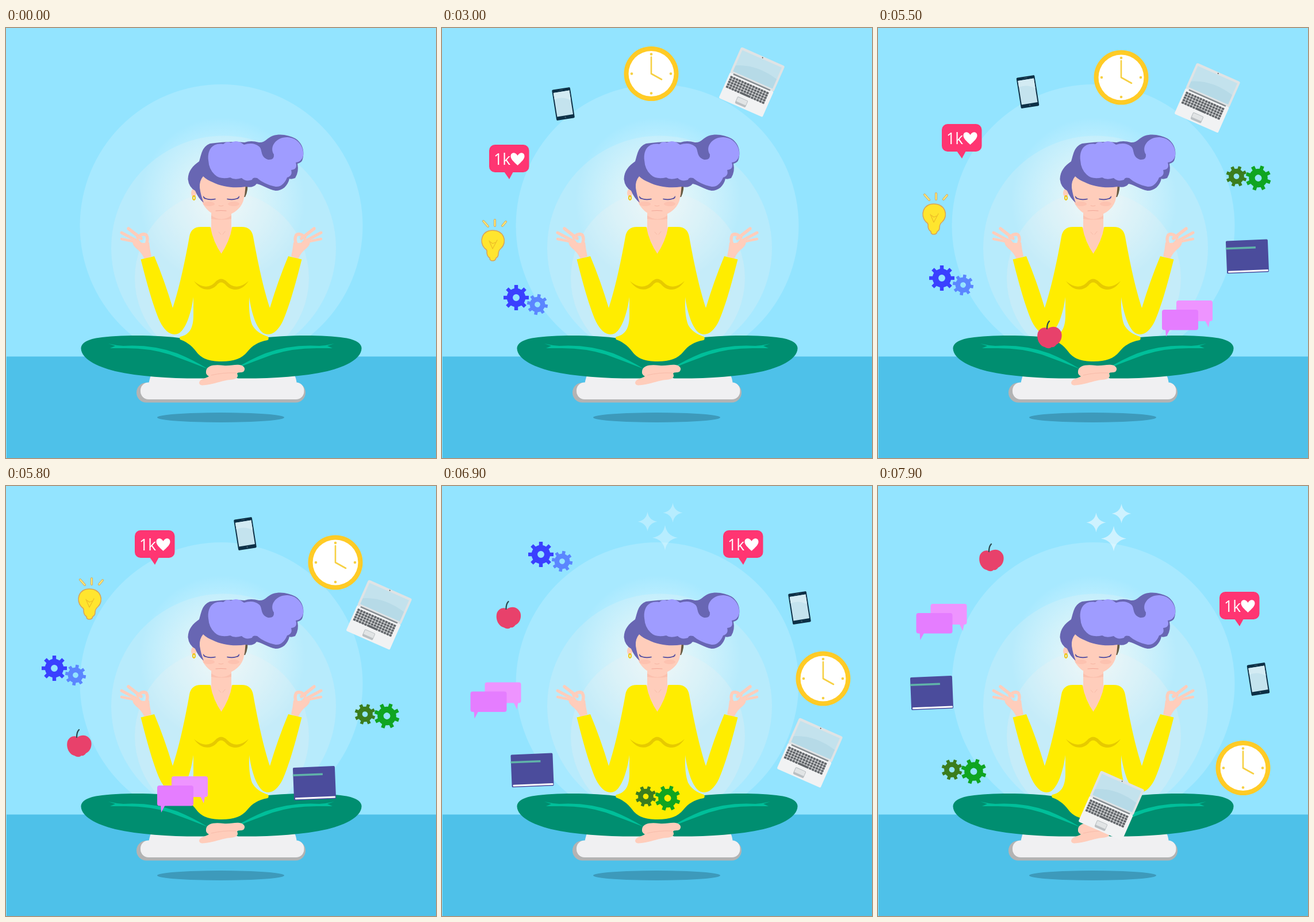
Animation of 748 by 748 pixels, one loop 8 s. Source, as an HTML page with a canvas:

```html
<!DOCTYPE html>
<html lang="en">
<head>
<meta charset="utf-8">
<title>Meditation</title>
<style>
  html, body { margin: 0; width: 100%; height: 100%; overflow: hidden; background: #93e4ff; }
  canvas { display: block; }
</style>
</head>
<body>
<canvas id="stage" width="748" height="748"></canvas>
<script>
const ctx = document.getElementById('stage').getContext('2d');
const LOOP = 8000, TAU = Math.PI * 2, AXIS = 374.5;
const SKIN = '#ffcdbb', YELLOW = '#ffed00', DARK_HAIR = '#6866b3', LIGHT_HAIR = '#9f9cff';

// ---------- drawing helpers ----------
function fill(d, color) {
  ctx.fillStyle = color;
  ctx.fill(new Path2D(d));
}
function line(d, color, width) {
  ctx.strokeStyle = color;
  ctx.lineWidth = width;
  ctx.lineCap = ctx.lineJoin = 'round';
  ctx.stroke(new Path2D(d));
}
function oval(x, y, rx, ry, color) {
  ctx.fillStyle = color;
  ctx.beginPath();
  ctx.ellipse(x, y, rx, ry, 0, 0, TAU);
  ctx.fill();
}
const disc = (x, y, r, color) => oval(x, y, r, r, color);
function box(x, y, w, h, color, r = 0) {
  ctx.fillStyle = color;
  ctx.beginPath();
  ctx.roundRect(x, y, w, h, r);
  ctx.fill();
}
function local(x, y, angle, draw) {
  ctx.save();
  ctx.translate(x, y);
  ctx.rotate(angle * Math.PI / 180);
  draw();
  ctx.restore();
}
function bothSides(draw) {
  draw();
  ctx.save();
  ctx.translate(AXIS * 2, 0);
  ctx.scale(-1, 1);
  draw();
  ctx.restore();
}

// ---------- scene ----------
function background() {
  box(0, 0, 748, 748, '#93e4ff');
  disc(374.5, 344, 246, 'rgba(255,255,255,.18)');
  disc(378.5, 383, 195.5, 'rgba(240,240,240,.21)');
  const glow = ctx.createRadialGradient(376, 300, 20, 376, 300, 145);
  glow.addColorStop(0, 'rgba(255,253,248,.68)');
  glow.addColorStop(.5, 'rgba(255,253,248,.36)');
  glow.addColorStop(1, 'rgba(255,255,255,0)');
  disc(376, 300, 145, glow);
  disc(375.5, 435, 151.5, 'rgba(238,238,238,.25)');
  box(1, 571.5, 747, 177, '#4ec1e9');
  oval(373.5, 677.5, 110.5, 8.5, '#3d9abb');
}

function cushion() {
  box(227, 617, 294, 34.5, '#b3b3b3', 17);
  box(234, 616.5, 284.5, 29.5, '#f0f0f2', 14);
  fill('M248 620Q250 608 254 600H500Q505 608 506 620Z', '#f0f0f2');
}

function legs() {
  bothSides(() => {
    fill('M376 560L310 540C265 534 200 533 160 539C140 542 130 549 130.500 558C132 575 155 588 190 597C235 607 290 610 345 609.500L380 600Z', '#008e70');
    fill('M178 549Q190 552 204 553Q254 550 298 566Q325 577 351 593Q318 580 285 568Q248 556 202 557L181 557L190 553Z', '#00bf9a');
  });
  fill('M348 597C349 587 362 585 378 587C390 588 398 585 406 586C414 587 418 593 413 598C409 600 404 598 402 601C405 607 402 611 390 612C376 613 367 618 354 620C345 621 337 624 336 617C337 610 347 610 353 606Q347 603 348 597Z', SKIN);
  line('M357 604Q378 599 400 600', '#f8bba9', 1);
}

function hand() {
  line('M231 373L201 367', SKIN, 4.5);
  line('M231 372L201 356', SKIN, 5);
  line('M235 366L213 349', SKIN, 5.5);
  line('M229 364Q238 356 244 360Q248 367 244 376', SKIN, 5.5);
  fill('M221 368L231 366Q231 374 240 374L249 373Q250 384 253 397L241 402Q235 389 226 383Q218 376 221 368Z', SKIN);
}

function shirt() {
  fill('M357 322H392V346L396 352L375 397L354 352L357 346Z', SKIN);
  fill('M357 326Q375 339 392 326V332Q375 335 357 332Z', '#fbc0ae');
  line('M370 355L374 359M381 354L377 359', '#f7bba8', 1);
  bothSides(() => fill('M355.500 346H339C327 346 321 352 319 363C311 408 301 454 290 487Q276 440 258 397L234.500 402.500C244 440 256 485 268 511C277 529 289 537 301 531C313 523 322 497 326 468L376 450V395Q360 372 355.500 346Z', YELLOW));
  fill('M325 440H424L423 470Q422 500 428 516Q436 531 456 537Q458 541 455 543C438 546 428 553 420 563C410 575 397 580 375 580C353 580 340 575 331 563C322 551 312 545 303 542Q301 539 303 537C320 534 326 520 326 500V468Z', YELLOW);
  fill('M327 440C340 452 354 453 364 442Q374 431 385 442C395 453 409 452 422 440C410 459 393 458 383 448Q374 437 366 448C355 459 338 457 327 440Z', '#e6ca00');
}

function head() {
  fill('M414 266H420Q422 282 416 294H412Z', '#665a42');
  oval(326.5, 287, 4.5, 7, SKIN);
  ctx.strokeStyle = '#f0c400';
  ctx.lineWidth = 1.8;
  ctx.beginPath();
  ctx.ellipse(327, 295.5, 2, 3.5, 0, 0, TAU);
  ctx.stroke();
  fill('M335 262L352 250H415Q419 278 413 300C408 317 390 327 376 327C361 327 347 317 341 302Q331 288 335 262Z', SKIN);
  oval(353, 306, 10, 4, 'rgba(250,174,158,.35)');
  oval(396, 306, 10, 4, 'rgba(250,174,158,.35)');
  bothSides(() => {
    line('M344 295Q352 300 364 297.500', '#4a489f', 1.6);
    line('M346 297L343.500 293', '#4a489f', 1.2);
  });
  line('M370 309Q374 311 378 309', '#f6b6a3', 1);
  line('M365 318Q374 317 383 318', '#f3a797', 1.2);
  fill('M344 304Q334 296 329 283Q318 277 316.500 263C317 248 325 240 336 232C340 221 340 207 355 201Q390 196 415 199Q426 195 440 199C451 200 454 191 464 187.500C478 183 493 187 503 192C516 200 520 215 516 228Q515 234 507 236Q510 250 503 261Q495 264 493 262C490 275 481 283 469 283C456 281 447 273 436 271Q430 279 417 276C398 279 377 277 359 268Q349 264 343 258Q336 266 337 278Q339 292 344 304Z', DARK_HAIR);
  fill('M352 230C350 211 360 199 378 202Q384 196 391 199.500Q402 193 414 203Q430 198 440 206C447 211 441 224 456 229Q467 230 466 220C457 206 471 189 490 190C509 191 519 209 517 222Q514 233 504 234Q508 246 496 247Q499 257 489 260C485 270 478 277 469 276C455 273 445 268 437 261Q429 259 428 264Q417 268 410 261Q397 265 390 260Q372 264 363 255Q353 246 352 230Z', LIGHT_HAIR);
}

// ---------- floating things, each drawn around its centre ----------
function gear(x, y, r, color, angle) {
  local(x, y, angle, () => {
    const body = r * .74, hole = r * .27, w = r * .2;
    ctx.fillStyle = color;
    ctx.beginPath();
    ctx.arc(0, 0, body, 0, TAU);
    ctx.arc(0, 0, hole, 0, TAU, true);
    ctx.fill();
    for (let k = 0; k < 8; k++) {
      ctx.rotate(TAU / 8);
      ctx.fillRect(-w / 2 - 1, -r, w + 2, r - body + 2);
    }
  });
}

function bulb() {
  const edge = '#d7a65c';
  for (const ray of ['M-17 -33L-9 -24', 'M3 -35V-25', 'M22 -32L16 -25']) {
    line(ray, edge, 4);
    line(ray, '#ffec78', 2);
  }
  const glass = 'M-11 21Q-10 17 -15 14C-25 3 -20 -17 -1 -17C19 -17 25 3 14 14Q9 18 9 24Q9 29 5 31Q4 36 -1 36Q-6 36 -6 31Q-11 28 -11 21Z';
  fill(glass, '#ffe52e');
  line(glass, edge, 1.6);
  line('M-7 1L-1 15L7 0M-5 3L-1 6L4 4', '#edbc27', 1.2);
}

function like() {
  box(-35, -30, 69.5, 48, '#ff3572', 10);
  fill('M-9 17H7L0 30Z', '#ff3572');
  ctx.fillStyle = '#fff';
  ctx.font = '26.5px "Open Sans", "Noto Sans", sans-serif';
  ctx.fillText('1k', -27, 5);
  fill('M14.500 6C8 0 2.500 -5 2.500 -10C2.500 -17 11 -18 14.500 -11C18 -18 26.500 -17 26.500 -10C26.500 -5 21 0 14.500 6Z', '#fff');
}

function phone() {
  local(0, 0, -9, () => {
    box(-16, -27, 32, 54, '#0d3046', 2);
    box(-14, -21.5, 28, 42, '#c4e3ee');
    fill('M-14 -21.500H14V-4Q0 -14 -14 -10Z', '#d3ebf3');
    box(-3, -25, 6, 1, '#3e5b6c');
    disc(0, 23.5, 1.3, '#3e5b6c');
  });
}

function clock() {
  disc(0, 0, 47.5, '#ffcb26');
  disc(0, 0, 39.5, '#fff');
  for (let k = 0; k < 4; k++) {
    disc(34 * Math.cos(k * TAU / 4), 34 * Math.sin(k * TAU / 4), 2.3, '#f6d043');
  }
  line('M0 -29V0L18 10', '#f6d043', 2.6);
}

function laptop() {
  local(0, 0, 23.8, () => {
    box(-41.5, -48.5, 83, 49, '#dfe3e5', 3);
    box(-37.5, -44, 75, 40, '#c3e2ed');
    fill('M-37.500 -15Q-5 -32 37.500 -22V-4H-37.500Z', '#b6dae7');
    disc(0, -46.3, 1, '#555');
    box(-41.5, 0, 83, 48.5, '#f1f2f3', 2);
    box(-35, -1, 70, 2.5, '#858b8f');
    for (let row = 0; row < 5; row++) {
      for (let col = 0; col < 14; col++) {
        if (row === 4 && col > 4 && col < 9) continue;
        box(-38 + col * 5.25, 4.6 + row * 4.6, 4.4, 3.8, '#62666a', .6);
      }
    }
    box(-11.7, 23, 20.1, 3.8, '#62666a', .6);
    box(-12.5, 32.5, 20, 13, '#babfc2', 2);
    box(-11.5, 33.5, 18, 8, '#e1e4e5', 1);
  });
}

function book() {
  local(0, 0, -2.3, () => {
    box(-36, -28.5, 73, 57, '#4b4c9c', 2);
    box(-34, 24, 70, 3, '#fff', 1);
    box(-36.5, -17, 52, 3.6, '#60b3a9');
  });
}

function chat() {
  box(-19, -32, 63, 36, '#ee94ff', 4);
  fill('M31 3H39L37 15Z', '#ee94ff');
  box(-44, -16, 63, 35.5, '#e57dff', 4);
  fill('M-38 18H-30L-37 31Z', '#e57dff');
}

function apple() {
  fill('M-3 -10C-8 -14 -17 -11 -20 -3C-23 8 -17 20 -8 22C-3 25 1 25 4 22C7 23 10 21 12 18C20 14 23 5 21 -3C18 -12 8 -17 -3 -10Z', '#e8416b');
  line('M-4 -10Q-4 -19 0 -23', '#2d4b52', 2.3);
}

// home slot, then places after 1/3, 4/3, 3 and 4 slots of travel
const STOPS = [0, 1 / 3, 4 / 3, 3, 4];
const items = [
  { draw() { gear(-16, -4, 22, '#3a40ff', 0); gear(21, 8, 18, '#5b86ff', 10); },
    path: [145, 473, 127, 439, 100, 321, 188, 123, 386, 71], end: 7700 },
  { draw: bulb, path: [89, 369, 98, 323, 146, 196, 379, 71, 530, 106], end: 6500 },
  { draw: like, path: [117, 233, 146, 197, 259, 107, 524, 107, 629, 214] },
  { draw: phone, path: [211, 132, 260.5, 111, 416, 83, 622, 212, 661.5, 336] },
  { draw: clock, path: [364, 79.5, 423, 86, 573, 133, 663, 335, 635, 490.5] },
  { draw: laptop, path: [539, 94, 573, 121.5, 649, 224, 640, 464, 406, 556] },
  { draw() { gear(-21, -3, 18, '#3b7d1e', 20); gear(17, 0, 22, '#0fa521', 19); },
    path: [636, 214.5, 644.5, 261, 645.5, 400, 375.5, 543, 149.5, 496.5] },
  { draw: book, path: [654, 347.5, 642, 397.5, 536, 517, 156.5, 494.5, 93, 360] },
  { draw: chat, path: [617, 480, 538, 506, 307, 537, 93.5, 373.5, 110.5, 237] },
  { draw: apple, path: [374, 556, 298, 533, 127, 447, 115.5, 224, 197, 124] }
];

// smooth closed ring through all home slots
function ring(slot, axis) {
  const i = Math.floor(slot), f = slot - i;
  const [a, b, c, d] = [-1, 0, 1, 2].map(k => items[(i + k + 10) % 10].path[axis]);
  return b + f * (c - a + f * (2 * a - 5 * b + 4 * c - d + f * (3 * (b - c) + d - a))) / 2;
}

function place(i, travel, axis) {
  let k = 0;
  while (k < 3 && travel > STOPS[k + 1]) k++;
  const off = n => items[i].path[n * 2 + axis] - ring(i + STOPS[n], axis);
  const f = (travel - STOPS[k]) / (STOPS[k + 1] - STOPS[k]);
  return ring(i + travel, axis) + off(k) * (1 - f) + off(k + 1) * f;
}

function travelAt(t) {
  if (t < 5500) return 0;
  if (t < 7100) return Math.min(9, Math.floor((t - 5500) / 100) + 1) / 3;
  return 3 + Math.min(3, Math.floor((t - 7100) / 200) + 1) / 3;
}

function star(x, y, r) {
  const q = r * .14;
  fill(`M${x} ${y - r}Q${x + q} ${y - q} ${x + r} ${y}Q${x + q} ${y + q} ${x} ${y + r}Q${x - q} ${y + q} ${x - r} ${y}Q${x - q} ${y - q} ${x} ${y - r}Z`, '#fff');
}

function sparkles(t) {
  let alpha = 0, x = 388, y = 90;
  if (t >= 7700) {
    alpha = t < 7900 ? .35 : .55;
    x = 410;
    y = 91.5;
  } else if (t >= 6500 && t < 7300) {
    alpha = [.35, .55, .33, .15][Math.floor((t - 6500) / 200)];
  }
  if (!alpha) return;
  ctx.globalAlpha = alpha;
  star(x, y, 22);
  star(x - 30.5, y - 28, 17);
  star(x + 13.5, y - 43.5, 17);
  ctx.globalAlpha = 1;
}

function render(t) {
  background();
  cushion();
  legs();
  bothSides(hand);
  shirt();
  head();
  const travel = travelAt(t);
  items.forEach(({ draw, end = LOOP }, i) => {
    if (t < 500 * (i + 1) || t >= end) return;
    const drop = draw === clock && t < 3000 ? 4.5 : 0;
    local(place(i, travel, 0), place(i, travel, 1) + drop, 0, draw);
  });
  sparkles(t);
}

const start = performance.now();
function tick() {
  render((performance.now() - start) % LOOP);
  requestAnimationFrame(tick);
}
tick();
</script>
</body>
</html>
```
